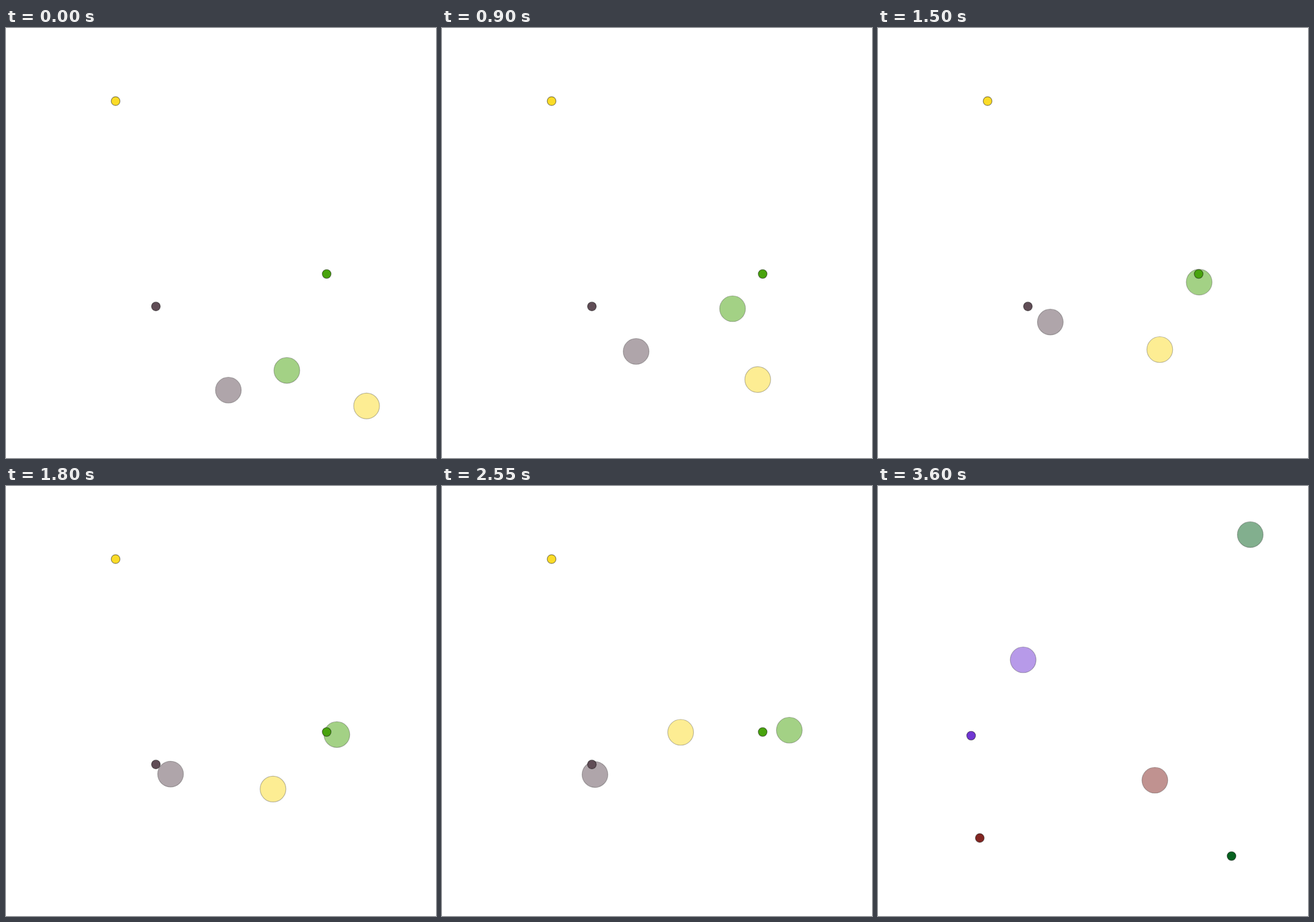
Animation, 700 px wide and 700 px high, one loop 3750 ms. Source, as an HTML page:

```html
<!DOCTYPE html>
<html lang="en">
<head>
<meta charset="utf-8">
<title>Circles seeking dots</title>
<style>
  html, body { margin: 0; width: 100%; height: 100%; overflow: hidden; background: #fff; }
  svg { display: block; width: 100%; height: 100%; }
  circle { stroke: #000; stroke-width: 1.2; }
  .seeker { fill-opacity: .5; stroke-opacity: .26; }
  .dot { stroke-opacity: .45; }
</style>
</head>
<body>
<svg viewBox="0 0 700 700"></svg>
<script>
const STEP = 150, STEPS = 25, CUT = 24;
const svg = document.querySelector('svg');

// Steps at which each path passes its key points.
const keys = [0, 3, 6, 10, 14, 17, 21];

const chase = [
  { color: '#604d56', dot: [244, 453.3],
    path: [[362, 589.5], [343, 561], [316, 526.5], [280.5, 478.7], [258, 465.7], [249, 469.7], [245, 467]] },
  { color: '#fbdc28', dot: [178.4, 119],
    path: [[587, 615.3], [555, 600], [514, 572.3], [458.7, 523.5], [413.2, 459.8], [388.5, 401], [365, 317]] },
  { color: '#48a30d', dot: [522, 400.4],
    path: [[457.2, 557.4], [459, 510], [473, 457], [522.8, 413.7], [550.8, 400.4], [565.4, 397.5], [569.2, 396.2]] }
];

const restart = [
  { color: '#7036d3', dot: [151.6, 406.4], path: [[236.3, 283]] },
  { color: '#822622', dot: [165.7, 573], path: [[450.7, 479]] },
  { color: '#06611f', dot: [575.5, 602.4], path: [[606, 79.2]] }
];

function add(parent, tag, attrs = {}) {
  const el = document.createElementNS('http://www.w3.org/2000/svg', tag);
  for (const name in attrs) el.setAttribute(name, attrs[name]);
  return parent.appendChild(el);
}

function circle(parent, kind, r, fill, [cx, cy]) {
  return add(parent, 'circle', { class: kind, r, fill, cx, cy });
}

function buildScene(items) {
  const group = add(svg, 'g');
  for (const item of items) item.el = circle(group, 'seeker', 21, item.color, item.path[0]);
  for (const item of items) circle(group, 'dot', 7.15, item.color, item.dot);
  return group;
}

function slope(path, i, axis) {
  const a = Math.max(i - 1, 0), b = Math.min(i + 1, keys.length - 1);
  return (path[b][axis] - path[a][axis]) / (keys[b] - keys[a]);
}

// Cubic Hermite curve; the last piece carries on past its end.
function along(path, step, axis) {
  let i = 0;
  while (i < keys.length - 2 && step >= keys[i + 1]) i++;
  const span = keys[i + 1] - keys[i];
  const u = (step - keys[i]) / span, v = 1 - u;
  return path[i][axis] * v * v * (1 + 2 * u) + path[i + 1][axis] * u * u * (3 - 2 * u)
    + span * u * v * (slope(path, i, axis) * v - slope(path, i + 1, axis) * u);
}

const chaseGroup = buildScene(chase);
const restartGroup = buildScene(restart);
const start = performance.now();

function draw() {
  const step = Math.floor((performance.now() - start) / STEP) % STEPS;
  const cut = step >= CUT;
  chaseGroup.style.display = cut ? 'none' : '';
  restartGroup.style.display = cut ? '' : 'none';
  if (!cut) {
    for (const { el, path } of chase) {
      el.setAttribute('cx', along(path, step, 0));
      el.setAttribute('cy', along(path, step, 1));
    }
  }
  requestAnimationFrame(draw);
}
draw();
</script>
</body>
</html>
```
